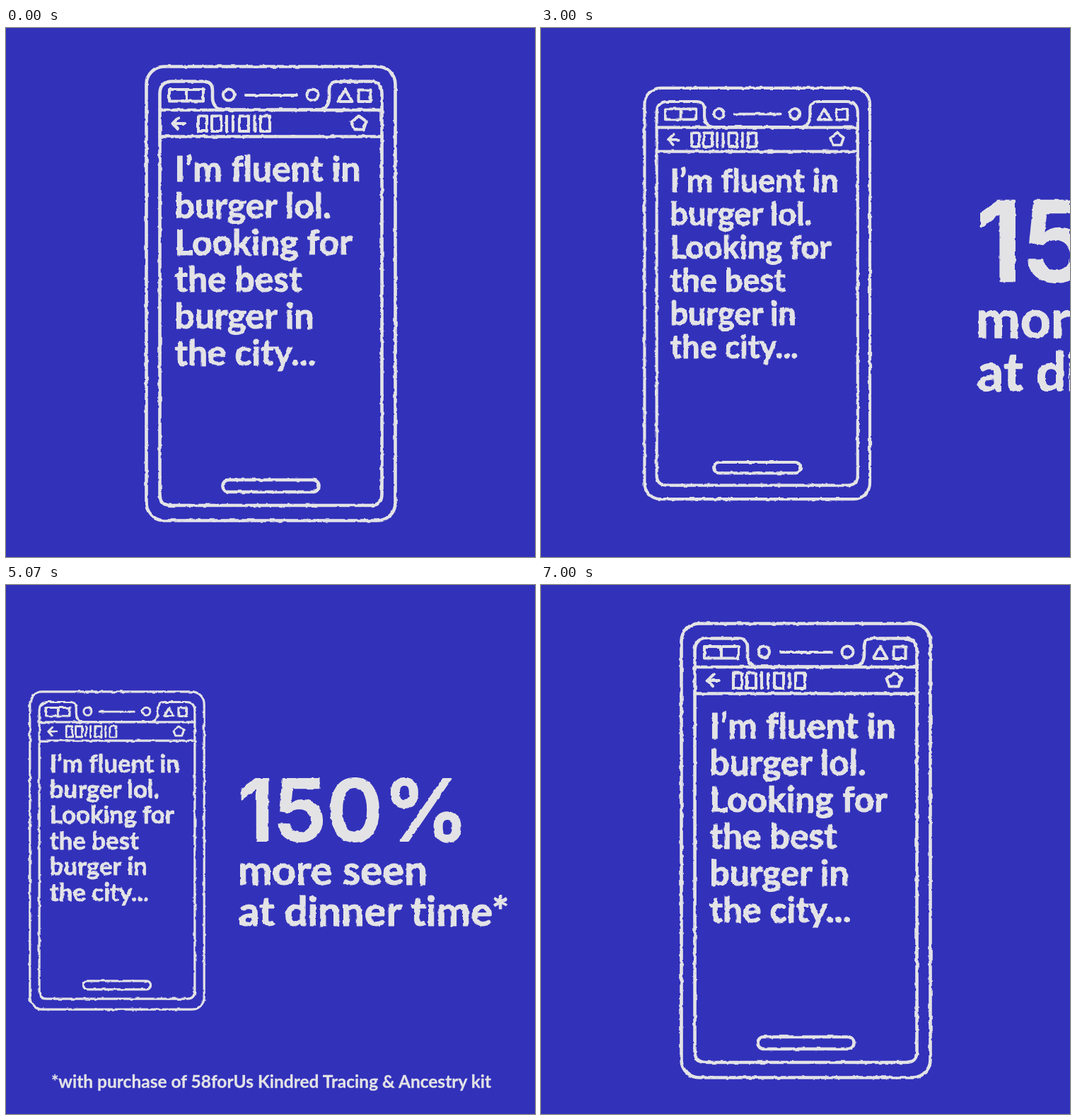
An HTML page that plays this animation: 748x748 px, repeating every 7070 ms.

```html
<!DOCTYPE html>
<html lang="en">
<head>
<meta charset="utf-8">
<title>Burger chat</title>
<style>
  html, body { margin: 0; width: 100%; height: 100%; overflow: hidden; background: #3231ba; }
  svg { display: block; width: 100vw; height: 100vh; }
  text {
    font-family: Lato, sans-serif; font-weight: 700; font-variant-ligatures: none;
    fill: #e3e3e6; stroke: #e3e3e6; stroke-linejoin: round;
  }
  .line { fill: none; stroke: #e3e3e6; stroke-width: 4.6; stroke-linecap: round; stroke-linejoin: round; }
  .icon { stroke-width: 4.1; }
  .chat { font-size: 49.7px; stroke-width: 1.1; }
  .number { font: 600 121px Inter, sans-serif; stroke-width: 1.8; }
  .claim { font-size: 58px; stroke-width: 1.1; }
  .note { font-size: 24.5px; text-anchor: middle; stroke-width: .3; }
</style>
</head>
<body>
<svg viewBox="0 0 748 748">
  <defs>
    <filter id="rough" filterUnits="userSpaceOnUse" x="0" y="0" width="748" height="748" color-interpolation-filters="sRGB">
      <feTurbulence type="fractalNoise" baseFrequency=".12" numOctaves="2" result="noise"/>
      <feDisplacementMap in="SourceGraphic" in2="noise" scale="3.2" xChannelSelector="R" yChannelSelector="G"/>
      <feGaussianBlur stdDeviation=".35"/>
    </filter>
    <filter id="slight" filterUnits="userSpaceOnUse" x="0" y="0" width="748" height="748" color-interpolation-filters="sRGB">
      <feTurbulence type="fractalNoise" baseFrequency=".12" numOctaves="2" result="noise"/>
      <feDisplacementMap in="SourceGraphic" in2="noise" scale="1.4" xChannelSelector="R" yChannelSelector="G"/>
      <feGaussianBlur stdDeviation=".3"/>
    </filter>
  </defs>

  <g filter="url(#rough)">
    <g id="phone">
      <g class="line">
        <rect x="198.5" y="54.5" width="352" height="642" rx="25"/>
        <path d="M217.5 93 Q217.5 75.5 235 75.5 H279 Q292 75.5 292 88 V98 Q292 112 305 115.5
                 H445 Q457 112 457 98 V88 Q457 75.5 470 75.5 H514 Q531.5 75.5 531.5 93
                 V659 Q531.5 675 516 675 H233 Q217.5 675 217.5 659 Z"/>
        <path d="M217.5 116 H531.5 M217.5 153.5 H531.5"/>
        <rect x="306.5" y="639" width="136" height="17" rx="8.5"/>
      </g>
      <g class="line icon">
        <path d="M231 87 H279 V103.5 H231 Z M255 87 V103.5 M339 95 H411"/>
        <circle cx="315" cy="94.5" r="8"/>
        <circle cx="433.5" cy="94.5" r="8"/>
        <path d="M479.5 87 L469.5 104 H489.5 Z M498.5 87.5 H515.5 V104 H498.5 Z"/>
        <path d="M252 135 H235.5 M244 126.5 L235.5 135 L243 143"/>
        <path d="M499 124.5 L509.5 132 L505.5 143.5 H492.5 L488.5 132 Z"/>
        <path d="M272 124.5 h12 v21.5 h-12 Z M291 124.5 h13 v21.5 h-13 Z M312 124.5 v21.5 M321 124.5 v21.5
                 M330 124.5 h13 v21.5 h-13 Z M351.5 124.5 v21.5 M360 124.5 h13 v21.5 h-13 Z"/>
      </g>
      <g id="chat" class="chat"></g>
    </g>
    <g id="offer">
      <text class="number" x="328" y="362">150%</text>
      <text class="claim" x="328" y="424">more seen</text>
      <text class="claim" x="329" y="482">at dinner time*</text>
    </g>
  </g>
  <g filter="url(#slight)">
    <g id="footer">
      <text class="note" x="375" y="711">*with purchase of 58forUs Kindred Tracing &amp; Ancestry kit</text>
    </g>
  </g>
</svg>
<script>
  const LOOP = 7070, FPS = 15, MID_Y = 375.5;
  const byId = id => document.getElementById(id);
  const phone = byId('phone'), offer = byId('offer'), footer = byId('footer');
  const noises = document.querySelectorAll('feTurbulence');
  const clamp = v => Math.max(0, Math.min(1, v));

  const message = ['I’m fluent in', 'burger lol.', 'Looking for', 'the best', 'burger in', 'the city...'];
  message.forEach((words, i) => {
    const line = document.createElementNS('http://www.w3.org/2000/svg', 'text');
    line.setAttribute('x', 238.5);
    line.setAttribute('y', 217 + 52 * i);
    line.textContent = words;
    byId('chat').append(line);
  });

  const easeOut = u => 1 - (1 - u ** 1.32) ** 3;
  const easeInOut = u => u < .5 ? (2 * u) ** 3.5 / 2 : 1 - (2 - 2 * u) ** 3.5 / 2;

  // 0: phone alone in the centre, 1: phone at the left beside the offer
  function progress(ms) {
    return ms < 5000 ? easeOut(clamp((ms - 2867) / 667))
                     : 1 - easeInOut(clamp((ms - 6000) / 1000));
  }

  function place(node, x, scale, pivotX) {
    node.setAttribute('transform',
      `translate(${x} ${MID_Y}) scale(${scale}) translate(${-pivotX} ${-MID_Y})`);
  }

  function draw(frame) {
    const p = progress(frame * 1000 / FPS);
    const phoneX = 374.5 - 217.5 * p;
    const scale = 1 - .3 * p;
    place(phone, phoneX, scale, 374.5);
    place(footer, phoneX, scale / .7, 157);
    place(offer, 333 + 422 * (1 - p), scale / .7, 333);
    noises.forEach(n => n.setAttribute('seed', 1 + Math.floor(frame / 4)));
  }

  let shown = -1;
  function tick() {
    const ms = performance.now() % LOOP;
    const frame = Math.min(105, Math.floor(ms * FPS / 1000 + .06));
    if (frame !== shown) draw(shown = frame);
    requestAnimationFrame(tick);
  }
  tick();
</script>
</body>
</html>
```
